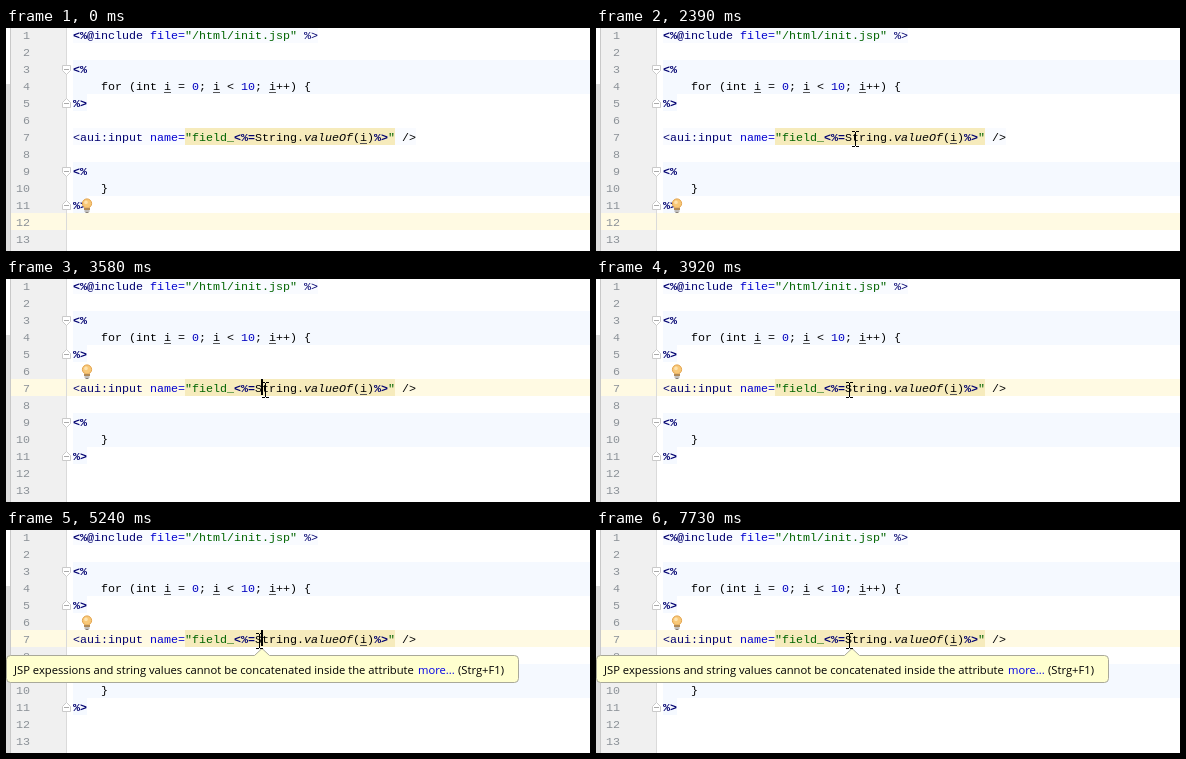
These frames come from a looping animation (584 px wide and 223 px high, 8 s). An HTML page:

```html
<!DOCTYPE html>
<html lang="en">
<head>
<meta charset="utf-8">
<title>JSP editor hint</title>
<style>
  html, body { margin: 0; width: 100%; height: 100%; overflow: hidden; background: #fff; }
  svg { display: block; }
  text { white-space: pre; }
  .code { font: 11.667px "Liberation Mono", "Courier New", monospace; fill: #000; }
  .mark { font-weight: bold; fill: #000070; }
  .tag { fill: #000070; }
  .attr { fill: #0000d0; }
  .str { fill: #006400; }
  .num { fill: #0000c0; }
  .call { font-style: italic; }
  .line { fill: #8c9298; }
  .tip { font: 11.22px "Open Sans", "Noto Sans", sans-serif; fill: #000; }
  .link { fill: #0000e6; }
</style>
</head>
<body>
<svg id="stage" width="584" height="223" viewBox="0 0 584 223"></svg>
<script>
const LOOP = 8000, LEFT = 67, CHAR = 7, PITCH = 17;
const stage = document.getElementById("stage");
const rowTop = n => PITCH * n - 19;
const baseline = n => PITCH * n - 6;

function add(tag, attrs, parent = stage) {
  const el = document.createElementNS("http://www.w3.org/2000/svg", tag);
  for (const key in attrs) el.setAttribute(key, attrs[key]);
  return parent.appendChild(el);
}
const group = () => add("g", {});
const rect = (x, y, width, height, fill, parent) => add("rect", { x, y, width, height, fill }, parent);
const path = (d, attrs, parent) => add("path", { d, ...attrs }, parent);
function label(x, y, str, cls, parent) {
  add("text", { x, y, class: cls }, parent).textContent = str;
}

// Gutter and row backgrounds
rect(0, 0, 584, 223, "#fff");
rect(0, 56, 4, 167, "#dcdcdc");
rect(4, 0, 1, 223, "#c9c9c9");
rect(5, 0, 55, 223, "#f0f0f0");
for (const n of [3, 9]) rect(LEFT, rowTop(n), 517, 2 * PITCH, "#f5f9ff");
for (const n of [5, 11]) rect(LEFT, rowTop(n), 14, PITCH, "#f5f9ff");
rect(LEFT, 0, 35 * CHAR, 15, "#f9fbff");
rect(LEFT, rowTop(7), 49 * CHAR, PITCH, "#f9fbff");
const activeRow = rect(5, 0, 579, PITCH, "#fffae3");
rect(60, 0, 1, 223, "#dadada");
rect(LEFT + 16 * CHAR, rowTop(7), 30 * CHAR, PITCH, "#f6ebbc");

// Code as [text, style] runs; "var" marks an underlined variable
const code = {
  1: [["<%@", "mark"], ["include ", "tag"], ["file=", "attr"], ['"/html/init.jsp"', "str"], [" %>", "tag"]],
  3: [["<%", "mark"]],
  4: [["    for (int "], ["i", "var"], [" = "], ["0", "num"], ["; "],
      ["i", "var"], [" < "], ["10", "num"], ["; "], ["i", "var"], ["++) {"]],
  5: [["%>", "mark"]],
  7: [["<aui:input ", "tag"], ["name=", "attr"], ['"field_', "str"], ["<%=", "mark"], ["String."],
      ["valueOf", "call"], ["("], ["i", "var"], [")"], ["%>", "mark"], ['"', "str"], [" />"]],
  9: [["<%", "mark"]],
  10: [["    }"]],
  11: [["%>", "mark"]]
};
for (const n in code) {
  let x = LEFT;
  for (const [str, cls = ""] of code[n]) {
    label(x, baseline(n), str, "code " + cls);
    if (cls === "var") rect(x, baseline(n) + 2, CHAR, 1, "#555");
    x += str.length * CHAR;
  }
}
for (let n = 1; n <= 13; n++) {
  label(24 - CHAR * String(n).length, baseline(n), String(n), "code line");
}

// Fold markers: pentagons pointing into their block
for (const [n, dir] of [[3, 1], [5, -1], [9, 1], [11, -1]]) {
  const y = PITCH * n - 10 + .5;
  path(`M56.5 ${y - 4 * dir}h8v${5 * dir}l-4 ${4 * dir}l-4 ${-4 * dir}z`, { fill: "#fff", stroke: "#cacaca" });
  rect(58, y - .5, 5, 1, "#aaa");
}

const bulb = group();
add("circle", { cx: 81, cy: 5.5, r: 4.6, fill: "#f8c878", stroke: "#e3a24a" }, bulb);
add("circle", { cx: 80, cy: 4.4, r: 1.8, fill: "#fde3b0" }, bulb);
rect(78, 10, 6, 2, "#b08a58", bulb);
rect(78.5, 12.5, 5, 1, "#86807a", bulb);
rect(79.5, 14, 3, 1, "#86807a", bulb);

const tip = group();
path("M4.5 125.5H248.5L256 118.5L263.5 125.5H508.5q4 0 4 4V148.5q0 4-4 4H4.5q-4 0-4-4V129.5q0-4 4-4z",
  { fill: "#ffffcf", stroke: "#a9a99a" }, tip);
label(8, 144, "JSP expessions and string values cannot be concatenated inside the attribute", "tip", tip);
label(412, 144, "more...", "tip link", tip);
label(452, 144, "(Strg+F1)", "tip", tip);

const click = add("circle", { cx: 258, cy: 110, r: 9, fill: "#f0e000", opacity: .65 });
const caret = rect(255, 100, 2, 16, "#000");
const pointer = group();
path("M0 .5h3m1 0h3M3.5 1v14M0 15.5h3m1 0h3", { stroke: "#000", fill: "none" }, pointer);

const blinks = [2720, 3700, 4260, 4790, 5240, 5790, 6220, 6770, 7300, 7730];
const show = (el, on) => el.setAttribute("visibility", on ? "visible" : "hidden");
const move = (el, x, y) => el.setAttribute("transform", `translate(${x} ${y})`);

function pointerAt(t) {
  if (t >= 3920) return [250, 103];
  if (t >= 2390) return [256, 103];
  if (t >= 2290) return [260, 103];
  const step = Math.min(6, Math.floor((t - 320) / 110)) / 6;
  const left = (1 - step) ** 2;
  return [Math.round(264 + 125 * left), Math.round(103 + 85 * left)];
}

function draw(t) {
  const clicked = t >= 2720;
  activeRow.setAttribute("y", rowTop(clicked ? 7 : 12));
  move(bulb, 0, clicked ? 85 : 170);
  show(bulb, !clicked || t >= 3580);
  show(click, clicked && t < 2850);
  show(caret, blinks.filter(b => b <= t).length % 2);
  show(tip, t >= 4040);
  show(pointer, t >= 320);
  move(pointer, ...pointerAt(Math.max(t, 320)));
}

const start = performance.now();
function tick() {
  draw((performance.now() - start) % LOOP);
  requestAnimationFrame(tick);
}
draw(0);
requestAnimationFrame(tick);
</script>
</body>
</html>
```
